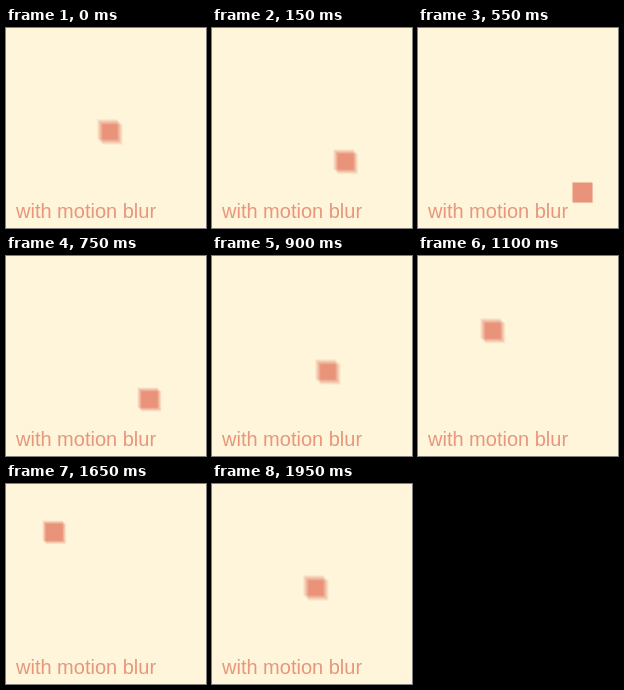
An HTML page with a canvas that plays this animation: 200 by 200 pixels, repeating every 2 s.

```html
<!DOCTYPE html>
<html lang="en">
<head>
<meta charset="utf-8">
<title>Motion blur</title>
<style>
  html, body { margin: 0; width: 100%; height: 100%; overflow: hidden; background: #fef5da; }
  canvas, svg { position: absolute; left: 0; top: 0; width: 200px; height: 200px; }
  text { font: 20px "Liberation Sans", Arial, sans-serif; fill: #e8967c; }
</style>
</head>
<body>
<canvas id="stage" width="200" height="200"></canvas>
<svg viewBox="0 0 200 200"><text x="10" y="190">with motion blur</text></svg>
<script>
const LOOP = 2000, STEP = 50, STEPS = 40;
const CENTER = 99.5, REACH = 66.7, SIZE = 20;
const SAMPLES = 17;   // divides 255, so the layers add up evenly
const SHUTTER = 0.6;  // exposure, in steps
const LEAD = 0.42;    // middle of the exposure, in steps
const ctx = document.getElementById('stage').getContext('2d');

const position = step => CENTER + REACH * Math.sin(2 * Math.PI * step / STEPS);

function draw(time) {
  let step = Math.floor((time % LOOP) / STEP);
  if (step >= 30) step++; // the motion skips one step at its turning point

  ctx.globalCompositeOperation = 'source-over';
  ctx.clearRect(0, 0, 200, 200);

  // Add up the coverage over the exposure, then tint it.
  ctx.globalCompositeOperation = 'lighter';
  ctx.globalAlpha = 1 / SAMPLES;
  ctx.fillStyle = '#000';
  for (let i = 0; i < SAMPLES; i++) {
    const offset = SHUTTER * ((i + 0.5) / SAMPLES - 0.5);
    const corner = position(step + LEAD + offset) - SIZE / 2;
    ctx.fillRect(corner, corner, SIZE, SIZE);
  }
  ctx.globalCompositeOperation = 'source-in';
  ctx.globalAlpha = 1;
  ctx.fillStyle = '#e8937a';
  ctx.fillRect(0, 0, 200, 200);
}

const start = performance.now();
function tick() {
  draw(performance.now() - start);
  requestAnimationFrame(tick);
}
tick();
</script>
</body>
</html>
```
